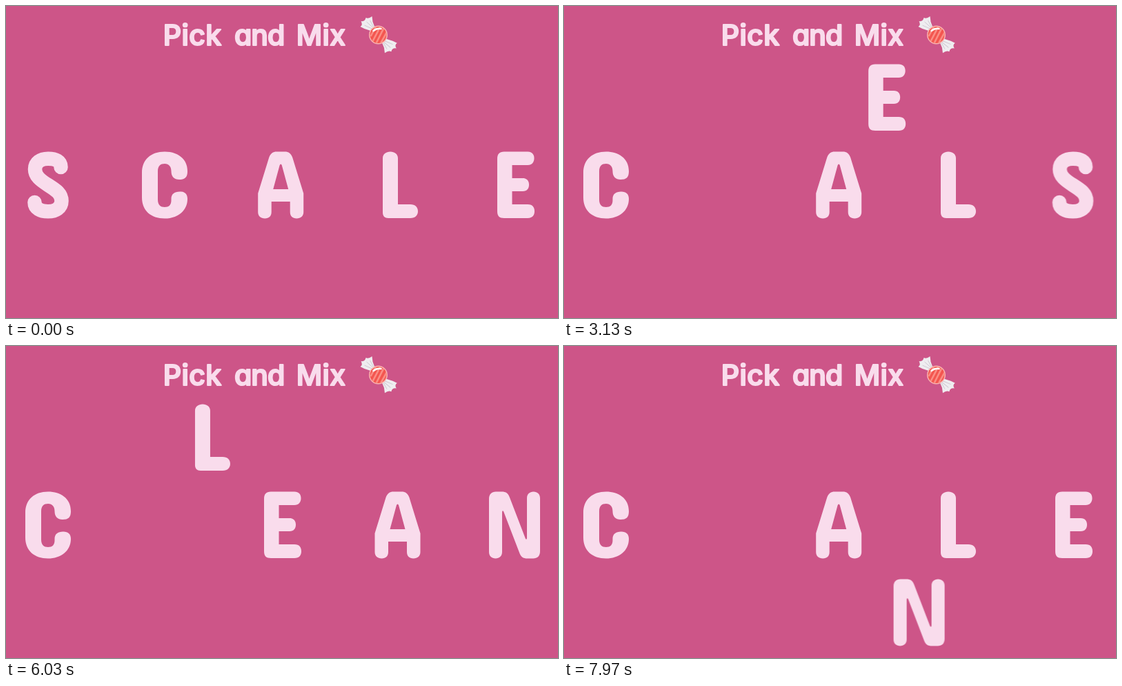
An HTML page that plays this animation: 800 by 453 pixels, repeating every 8000 ms.

```html
<!DOCTYPE html>
<html lang="en">
<head>
<meta charset="utf-8">
<title>Pick and Mix</title>
<style>
  html, body {
    margin: 0;
    width: 100%;
    height: 100%;
    overflow: hidden;
    background: #cd5588;
  }
  svg { display: block; width: 800px; height: 453px; }

  .title {
    font: 500 41px Inter, "Open Sans", sans-serif;
    font-feature-settings: "cv11"; /* single-storey a */
    letter-spacing: .4px;
    fill: #f9dcec;
    stroke: #f9dcec;
    stroke-width: 2.2px;
    stroke-linejoin: round;
  }
  .tight { letter-spacing: -1px; }

  .letter {
    fill: #f9dcec;
    fill-rule: evenodd;
    animation: 8s cubic-bezier(.37, 0, .63, 1) infinite;
  }
  .stroked {
    fill: none;
    stroke: #f9dcec;
    stroke-width: 20.5px;
    stroke-linecap: round;
  }

  /* Slots sit at x = 61, 230, 399, 568, 737; lanes at y = 133, 260, 387.
     Each trip leaves its slot, crosses in a lane, then enters the new slot. */
  #c { animation-name: c; }
  @keyframes c {
    0%, 13.25%     { translate: 230px 260px; }
    16.53%         { translate: 230px 133px; }
    21.5%          { translate: 61px 133px; }
    24.69%, 100%   { translate: 61px 260px; }
  }

  #s { animation-name: s, fade-out; }
  @keyframes s {
    0%, 20.56%     { translate: 61px 260px; }
    23.69%         { translate: 61px 387px; }
    34.32%         { translate: 737.5px 387px; }
    37.45%, 100%   { translate: 737.5px 260px; }
  }
  @keyframes fade-out {
    0%, 58.25%     { opacity: 1; }
    62.5%, 100%    { opacity: 0; }
  }

  #e { animation-name: e; }
  @keyframes e {
    0%, 32.31%     { translate: 737px 260px; }
    35.44%         { translate: 737px 133px; }
    40.69%         { translate: 399px 133px; }
    43.81%, 85.18% { translate: 399px 260px; }
    88.3%          { translate: 399px 133px; }
    93.55%         { translate: 737px 133px; }
    96.68%, 100%   { translate: 737px 260px; }
  }

  #a { animation-name: a; }
  @keyframes a {
    0%, 39.38%     { translate: 398.2px 260px; }
    42.5%          { translate: 398.2px 387px; }
    47.38%         { translate: 567.5px 387px; }
    50.5%, 77.81%  { translate: 567.5px 260px; }
    80.94%         { translate: 567.5px 387px; }
    85.81%         { translate: 398.2px 387px; }
    88.94%, 100%   { translate: 398.2px 260px; }
  }

  #l { animation-name: l; }
  @keyframes l {
    0%, 46.51%     { translate: 568px 260px; }
    49.64%         { translate: 568px 133px; }
    54.94%         { translate: 230px 133px; }
    58.06%, 70.73% { translate: 230px 260px; }
    73.85%         { translate: 230px 133px; }
    79.1%          { translate: 568px 133px; }
    82.23%, 100%   { translate: 568px 260px; }
  }

  #n { animation-name: n, fade-in; }
  @keyframes n {
    0%, 92.55%     { translate: 737px 260px; }
    95.68% {
      translate: 737px 387px;
      animation-timing-function: cubic-bezier(.12, 0, .39, 0); /* loop cuts mid-crossing */
    }
    100%           { translate: 480px 387px; }
  }
  @keyframes fade-in {
    0%, 58.25%     { opacity: 0; }
    62.5%, 100%    { opacity: 1; }
  }
</style>
</head>
<body>
<svg viewBox="0 0 800 453">
  <defs>
    <clipPath id="ball"><circle r="12"/></clipPath>
    <g id="wrapper">
      <path fill="#efedf0" d="M-11 -6 L-20 -9 L-26 -12 Q-22 -15 -25 -20 Q-19 -19 -18 -25 Q-14 -23 -9 -27 L-8 -19 L-5 -11Z"/>
      <path fill="none" stroke="#cfc9d2" d="M-9 -9 L-20 -14 M-8 -11 L-17 -19 M-7 -12 L-12 -21"/>
    </g>
  </defs>

  <text class="title" y="57"><tspan x="227.8">Pick</tspan> <tspan class="tight" x="331">and</tspan> <tspan x="420.8">Mix</tspan></text>

  <g transform="translate(539.5 42)">
    <use href="#wrapper"/>
    <use href="#wrapper" transform="rotate(180) scale(1.05 .97)"/>
    <circle r="13.5" fill="#f9b4b0"/>
    <circle r="12" fill="#f3564f"/>
    <path clip-path="url(#ball)" fill="none" stroke="#fb8e85" stroke-width="2.6"
      d="M-11 2 L-3 -13 M-8 9 L3 -12 M-3 12 L8 -10 M3 13 L13 -5"/>
    <path fill="none" stroke="#fff" stroke-width="2.6" stroke-linecap="round" d="M-7 -6 Q-2 -10 4 -9"/>
  </g>

  <path id="s" class="letter stroked" d="M18.5 -26 C18.5 -35 11 -38.3 0 -38.3 C-11 -38.3 -19 -33 -19 -23 C-19 -13 -11 -7 0 0 C11 7 19.5 12 19.5 23 C19.5 33 11 38.3 0 38.3 C-11 38.3 -19.5 34 -19.5 25"/>
  <path id="c" class="letter" d="M33 -20 C33 -39 18 -48.5 0 -48.5 C-20 -48.5 -33 -37 -33 -18 V18 C-33 37 -20 48.5 0 48.5 C18 48.5 33 38 33 20 C33 13 29 9.5 22 9.5 C14 9.5 9.5 13 9.5 20 V22 C9.5 29 6 32 0 32 C-6 32 -10 29 -10 21 V-20 C-10 -28 -6 -31 0 -31 C6 -31 9.5 -27 9.5 -20 C9.5 -12 14 -8 21 -8 C29 -8 33 -11 33 -20Z"/>
  <path id="a" class="letter" d="M-33 12 L-17 -40 C-15 -46 -11 -48.5 -6 -48.5 H6 C11 -48.5 15 -46 17 -40 L33 12 V39 C33 45 29 48.5 23 48.5 S13.5 45 13.5 39 V24 H-13.5 V39 C-13.5 45 -17 48.5 -23 48.5 S-33 45 -33 39Z M-11 6 L-1.5 -29 Q0 -32 1.5 -29 L11 6Z"/>
  <path id="l" class="letter" d="M-22 -39 C-22 -45 -17 -48.5 -11 -48.5 S0 -45 0 -39 V28 H18 C25 28 29 32 29 38 S25 48 18 48 H-14 C-19 48 -22 45 -22 40Z"/>
  <path id="e" class="letter" d="M-25 -38 C-25 -45 -22 -48.5 -15 -48.5 H19 C25 -48.5 28.5 -45 28.5 -39 S25 -29 19 -29 H-3.5 V-10 H12 C18 -10 21 -6 21 -.5 S18 9 12 9 H-3.5 V28 H19 C26 28 29 32 29 38 S26 48 19 48 H-15 C-22 48 -25 45 -25 38Z"/>
  <path id="n" class="letter" d="M-37 -38 C-37 -45 -33 -48.5 -27 -48.5 H-19 C-12 -48.5 -9 -46 -7 -40 L16 20 Q18 22 18 18 V-39 C18 -45 22 -48.5 27.5 -48.5 S37 -45 37 -39 V38 C37 45 33 48.5 27 48.5 H19 C12 48.5 9 46 7 40 L-16 -20 Q-18 -22 -18 -18 V39 C-18 45 -22 48.5 -27.5 48.5 S-37 45 -37 39Z"/>
</svg>
</body>
</html>
```
